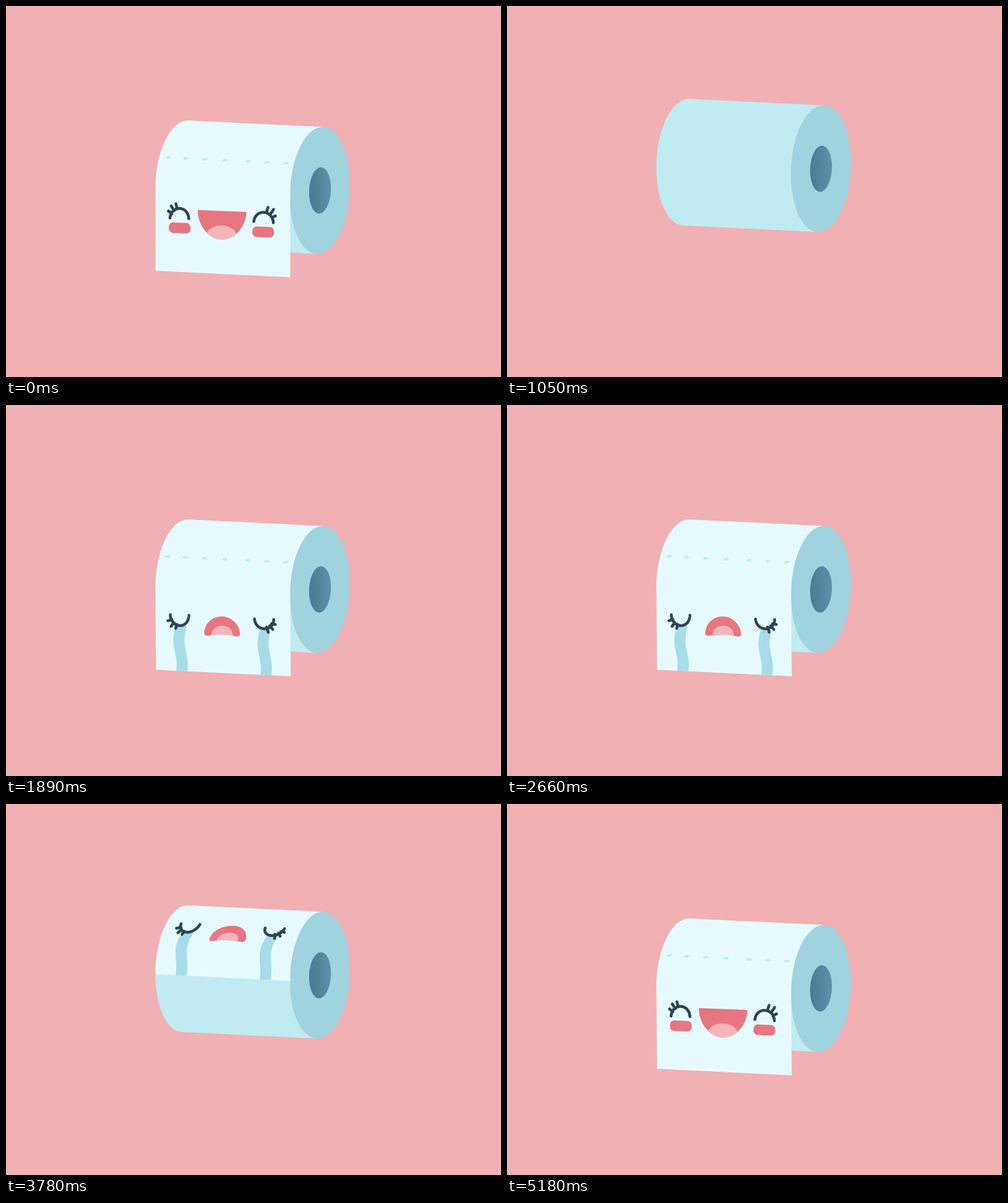
Recreate the animation shown at these times as an HTML page. Size 800x600 px, loop 5250 ms.

```html
<!DOCTYPE html>
<html lang="en">
<head>
<meta charset="utf-8">
<title>Paper roll moods</title>
<style>
  html, body { margin: 0; width: 100%; height: 100%; overflow: hidden; background: #f1b0b4; }
  svg { display: block; width: 100vw; height: 100vh; }
  .ink { fill: none; stroke: #2f4450; stroke-width: 4.6; stroke-linecap: round; stroke-linejoin: round; }
</style>
</head>
<body>
<svg id="stage" viewBox="0 0 800 600">
  <defs>
    <linearGradient id="tube" x1="0" y1=".6" x2="1" y2=".4">
      <stop offset="0" stop-color="#4a7a94"/>
      <stop offset="1" stop-color="#5f91a9"/>
    </linearGradient>
    <clipPath id="sheetClip"><path id="sheetShape"/></clipPath>
    <clipPath id="mouthClip"><path id="mouthShape"/></clipPath>
  </defs>
  <rect width="800" height="600" fill="#f1b0b4"/>
  <g id="roll">
    <path id="body" fill="#c0ebf0"/>
    <g transform="translate(507.5 298.2) rotate(3)">
      <ellipse rx="48.3" ry="102.6" fill="#9fd3de"/>
      <ellipse rx="17.6" ry="37.5" fill="url(#tube)"/>
    </g>
    <path id="sheet" fill="#e6fafd"/>
    <g id="print" clip-path="url(#sheetClip)"></g>
  </g>
</svg>
<script>
const LOOP = 5250, STEP = 70, SECOND = 3153, SWAP = 900;
const RX = 48.3, RY = 102.6, WRAP = 101, LENGTH = 143, TILT = Math.PI / 60;
const CENTER = { x: 289.8, y: 287.7 }, AXIS = { x: 217.7, y: 10.5 };
const BASE = { x: 241.6, y: 285.2 };
const HORIZON = -WRAP * Math.PI / 2;
const $ = id => document.getElementById(id);

function make(tag, attrs, parent) {
  const el = document.createElementNS('http://www.w3.org/2000/svg', tag);
  for (const key in attrs) el.setAttribute(key, attrs[key]);
  if (parent) parent.append(el);
  return el;
}

// Smooth curve through [time, value] pairs, flat at turning points.
function track(keys, t) {
  const last = keys.length - 1;
  if (t <= keys[0][0]) return keys[0][1];
  if (t >= keys[last][0]) return keys[last][1];
  const slope = i => (keys[i + 1][1] - keys[i][1]) / (keys[i + 1][0] - keys[i][0]);
  const tangent = i => {
    if (i === 0 || i === last) return 0;
    const a = slope(i - 1), b = slope(i);
    return a * b <= 0 ? 0 : 2 * a * b / (a + b);
  };
  const i = keys.findIndex(k => k[0] > t) - 1;
  const span = keys[i + 1][0] - keys[i][0], p = (t - keys[i][0]) / span;
  const q = 1 - p;
  return keys[i][1] * (1 + 2 * p) * q * q + keys[i + 1][1] * p * p * (3 - 2 * p)
    + span * p * q * (tangent(i) * q - tangent(i + 1) * p);
}

// How far the paper is unrolled; dip and drop are the two overshoots.
const windKeys = (dip, drop) => [
  [70, 0], [400, dip], [490, dip * .5], [560, -32], [630, -136], [700, -240], [770, -320],
  [1050, -320], [1120, -240], [1190, -140], [1260, -27], [1330, drop - 5], [1400, drop],
  [1540, drop * .2], [1680, 0]
];
const WIND = [windKeys(19, 31), windKeys(30, 22)];
const LIFT = [
  [70, 0], [400, 2], [560, 0], [630, -22], [700, -33], [790, -38], [890, -40], [1000, -38],
  [1120, -28], [1190, -16], [1260, -4.5], [1330, 2], [1400, 3], [1680, 0]
];
const SWAY = [[0, 0], [560, 0], [1190, -4], [1260, -3], [1330, 4], [1400, 5], [1680, 1]];
const OPEN = [[1190, .76], [1260, .76], [1550, 1]];

// Maps a spot on the sheet (a across, s along) onto the roll or the hanging part.
function place(a, s, sway) {
  if (s >= 0) {
    return [BASE.x + AXIS.x * a + sway * (s / LENGTH) ** 2, BASE.y + AXIS.y * a + s];
  }
  return onRim(a, Math.max(s, HORIZON) / WRAP);
}

function onRim(a, angle) {
  const x = -RX * Math.cos(angle), y = RY * Math.sin(angle);
  return [
    CENTER.x + AXIS.x * a + x * Math.cos(TILT) - y * Math.sin(TILT),
    CENTER.y + AXIS.y * a + x * Math.sin(TILT) + y * Math.cos(TILT)
  ];
}

const toPath = points => 'M' + points.map(p => p[0].toFixed(2) + ' ' + p[1].toFixed(2)).join('L');
const range = (n, fn) => Array.from({ length: n + 1 }, (_, i) => fn(i / n));

function sample(d, n = 120) {
  const path = make('path', { d }), total = path.getTotalLength();
  return range(n, p => {
    const { x, y } = path.getPointAtLength(total * p);
    return [x, y];
  });
}

const oval = (x, y, rx, ry) =>
  `M${x - rx} ${y}a${rx} ${ry} 0 1 1 ${2 * rx} 0a${rx} ${ry} 0 1 1 ${-2 * rx} 0`;

function cheek(x, y) {
  return `M${x - 10} ${y - 9}l21 .9a7 7 0 0 1 6.7 7.3l-.1 3a7 7 0 0 1 -7.3 6.7`
    + 'l-21 -.9a7 7 0 0 1 -6.7 -7.3l.1 -3a7 7 0 0 1 7.3 -6.7Z';
}

function tear(x, y) {
  const middle = v => x + 2.5 * Math.sin((v - 43) / 12);
  const side = (w, v) => [middle(v) + w, y + v];
  return [...range(30, p => side(-9, p * 110)), ...range(30, p => side(9, 110 - p * 110))];
}

// Printed parts, drawn flat as they lie on the resting sheet.
const parts = [];
function add(mood, shape, attrs) {
  const points = typeof shape === 'string' ? sample(shape) : shape;
  const middle = points.reduce((sum, p) => sum + p[1], 0) / points.length;
  const part = { mood, points, middle, el: make('path', attrs, $('print')) };
  parts.push(part);
  return part;
}
const ink = (mood, ...shapes) => shapes.forEach(d => add(mood, d, { class: 'ink' }));
const fill = (mood, shape, color, extra) => add(mood, shape, { fill: color, ...extra });
const ROSE = '#e77681', TONGUE = '#f5b5ba', TEAR = '#a6dce8';
const inMouth = { 'clip-path': 'url(#mouthClip)' };

[256, 284, 315, 348, 385, 415.5, 446].forEach(x => {
  fill('any', oval(x, 243.5 + (x - BASE.x) * AXIS.y / AXIS.x, 4, 2.5), '#c0eaf0');
});

const smile = fill('happy',
  'M310 330L388.5 333C388 353 373 377.5 349 377.5C326 377.5 309 352 310 330Z', ROSE);
fill('happy', oval(348, 371, 24, 16), TONGUE, inMouth);
fill('happy', cheek(280.5, 359), ROSE);
fill('happy', cheek(415.5, 365.5), ROSE);
ink('happy',
  'M265 343C267 322 294 322 295.5 344', 'M268 336L262.5 331.5', 'M272 331L267 323.5', 'M277 328L274.5 320',
  'M400.5 348.5C403 328 431 329 432 350.5', 'M421 333L423.5 325.5', 'M427 337L432.5 329', 'M430 342L435.5 339.5');

fill('sad', tear(281.5, 357), TEAR);
fill('sad', tear(417.5, 363), TEAR);
const frown = fill('sad',
  'M320 369C321 352 334 342 349 342C364 342 378 356 378 371Q377 376 370 374Q349 369 327 373Q320 374 320 369Z', ROSE);
fill('sad', oval(349, 371, 17, 14), TONGUE, inMouth);
ink('sad',
  'M265.5 339C266 361 294 364 295.5 340', 'M268 347L261.5 349', 'M271 352L266.5 358', 'M276 355L274 361',
  'M401.5 346C403 366 431 368 432.5 347', 'M429 353.5L435 355', 'M426 357L431 363', 'M421 359L423.5 367.5');

$('body').setAttribute('d', toPath([
  ...range(40, p => onRim(0, (p - .5) * Math.PI)),
  ...range(40, p => onRim(1, (.5 - p) * Math.PI))
]) + 'Z');

function render(now) {
  const t = Math.floor(now % LOOP / STEP) * STEP;
  const half = t < SECOND ? 0 : 1;
  const phase = t - half * SECOND;
  const wind = track(WIND[half], phase);
  const sway = track(SWAY, phase);
  const mood = (phase < SWAP) === (half === 0) ? 'happy' : 'sad';
  const open = half && mood === 'happy' ? track(OPEN, phase) : 1;

  $('roll').setAttribute('transform', `translate(0 ${track(LIFT, phase).toFixed(2)})`);

  const edge = LENGTH + wind;
  const along = p => HORIZON + (edge - HORIZON) * p;
  const outline = edge > HORIZON ? toPath([
    ...range(60, p => place(0, along(p), sway)),
    ...range(60, p => place(1, along(1 - p), sway))
  ]) + 'Z' : '';
  $('sheet').setAttribute('d', outline);
  $('sheetShape').setAttribute('d', outline);

  const project = part => toPath(part.points.map(([x, y]) => {
    if (part === smile) y = 331.5 + (y - 331.5) * open;
    const a = (x - BASE.x) / AXIS.x;
    return place(a, y - BASE.y - AXIS.y * a + wind, sway);
  }));
  for (const part of parts) {
    const hidden = part.middle - BASE.y + wind < HORIZON + 4;
    const shown = !hidden && (part.mood === 'any' || part.mood === mood);
    part.el.setAttribute('d', shown ? project(part) : '');
  }
  $('mouthShape').setAttribute('d', project(mood === 'happy' ? smile : frown));
}

const start = performance.now();
function tick() {
  render(performance.now() - start);
  requestAnimationFrame(tick);
}
tick();
</script>
</body>
</html>
```
